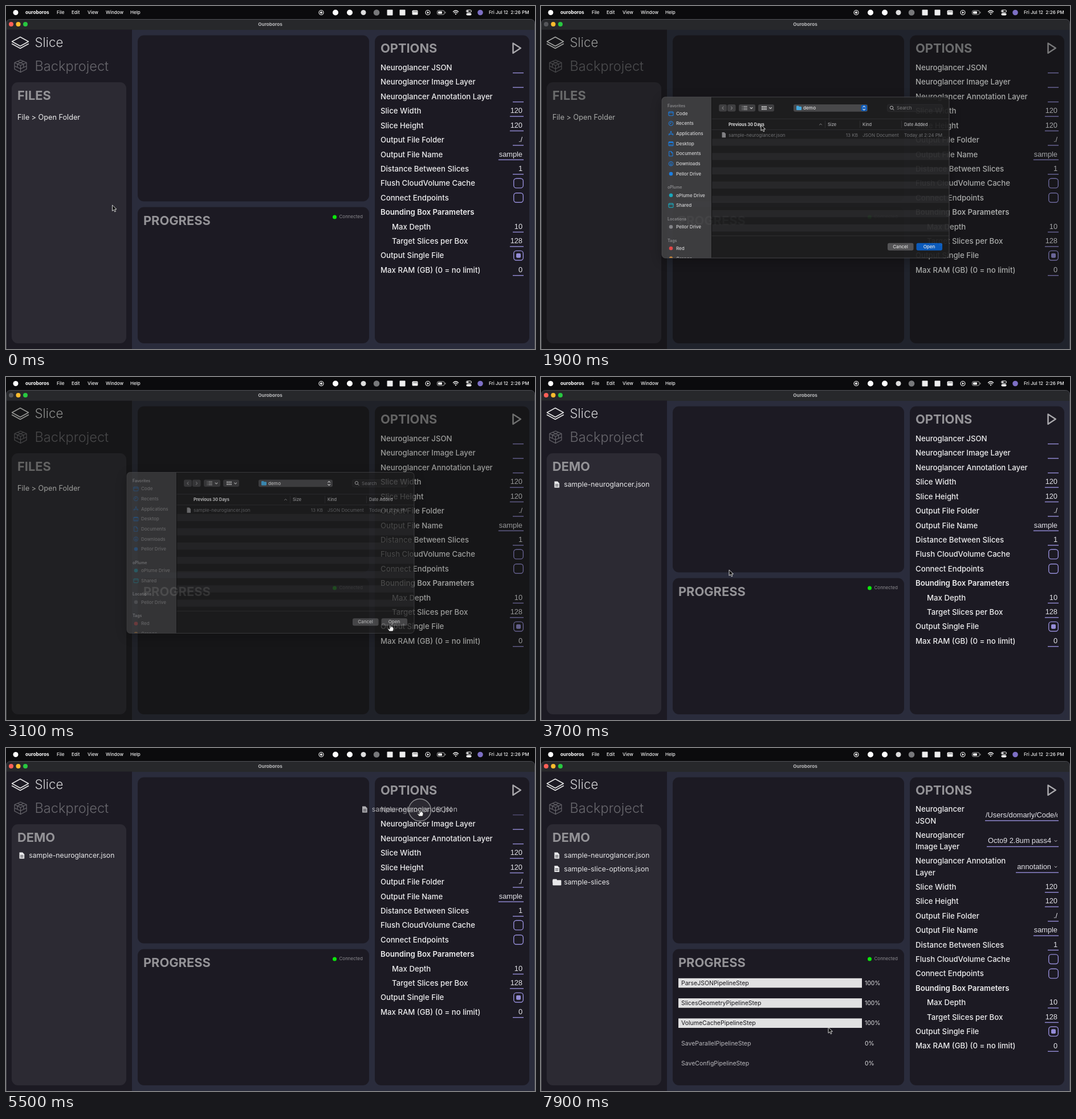
An HTML page for the animation above (8 s loop, 928 by 603 pixels).

```html
<!DOCTYPE html>
<html lang="en">
<head>
<meta charset="utf-8">
<title>Ouroboros</title>
<style>
html, body { margin: 0; width: 100%; height: 100%; overflow: hidden; background: #0b0b0d; }
svg { display: block; width: 100%; height: 100%; font-family: Inter, "Noto Sans", sans-serif; }
text { white-space: pre; }
</style>
</head>
<body>
<svg id="stage" viewBox="0 0 928 603"></svg>
<script>
const LOOP = 8000, STEP = 100;
const ACCENT = "#948cd6", PANEL = "#1c1a23", WHITE = "#eeeeef", HEADING = "#949397", BLUE = "#1a87f5";

// Markup helpers; text is placed by the middle of its capitals
const text = (x, y, size, str, fill = WHITE, extra = "") =>
  `<text x="${x}" y="${y + size * 0.36}" font-size="${size}" fill="${fill}" ${extra}>${str.replace(/>/g, "&gt;")}</text>`;
const rect = (x, y, w, h, fill, rx = 0, extra = "") =>
  `<rect x="${x}" y="${y}" width="${w}" height="${h}" rx="${rx}" fill="${fill}" ${extra}/>`;
const dot = (x, y, r, fill, extra = "") => `<circle cx="${x}" cy="${y}" r="${r}" fill="${fill}" ${extra}/>`;
const line = (d, stroke, width = 1, extra = "") =>
  `<path d="${d}" fill="none" stroke="${stroke}" stroke-width="${width}" stroke-linejoin="round" stroke-linecap="round" ${extra}/>`;
const group = (id, body, extra = "") => `<g id="${id}" ${extra}>${body}</g>`;
const weight = w => `font-weight="${w}"`;
const END = 'text-anchor="end"', MID = 'text-anchor="middle"';
const heading = (x, y, str) => text(x, y, 21.8, str, HEADING, weight(700));

function menuBar() {
  const menus = [[89, "File"], [115, "Edit"], [143, "View"], [175, "Window"], [218, "Help"]];
  const ring = x => dot(x, 11.5, 4, "none", 'stroke="#fff" stroke-width="1.1"');
  return rect(0, 0, 928, 23, "#0b0b0d") + dot(17, 11.5, 4.5, "#fff") +
    group("fileHighlight", rect(84, 3, 23, 17, "#45464b", 3)) +
    text(34, 11.2, 8.3, "ouroboros", "#fff", weight(700)) +
    menus.map(([x, s]) => text(x, 11.2, 8, s, "#f2f2f2", weight(500))).join("") +
    ring(553) + dot(553, 11.5, 2, "#fff") + dot(578, 11.5, 5, "#fff") + dot(603, 11.5, 5, "#fff") +
    dot(627, 11.5, 4.5, "#ddd") + dot(650, 11.5, 5.3, "#77787a") +
    rect(668.5, 6.5, 10, 10, "#eee", 1) + rect(690.5, 6.5, 10, 10, "#eee", 1) +
    rect(712.5, 7.5, 10, 8, "#f2f2f2", 1.5) + line("M715 10h1M717.5 10h1M720 10h1", "#222", 1) +
    ring(740) + `<path d="M738.8 9.3l3.5 2.2-3.5 2.2z" fill="#fff"/>` +
    rect(756.5, 8, 12.5, 7, "none", 2, 'stroke="#aaa"') + rect(758, 9.5, 7, 4, "#fff", 1) +
    line("M770.8 10.5v2", "#aaa") +
    line("M784.5 10q4.5-4 9 0M786.2 12q2.8-2.4 5.6 0", "#fff", 1.3) + dot(789, 14.2, 1.1, "#fff") +
    rect(807.5, 7, 9, 4, "none", 2, 'stroke="#fff"') + rect(807.5, 12.5, 9, 4, "#fff", 2) +
    dot(810, 9, 1.3, "#fff") + dot(832, 11.5, 4.8, "#7d6fc4") +
    text(847, 11.2, 8.1, "Fri Jul 12  2:26 PM", "#f2f2f2", weight(500));
}

function windowFrame() {
  return rect(0.5, 23.5, 927, 590, "#2a2c3c", 7, 'stroke="#505156"') +
    `<path d="M1 42V31q0-7 7-7h912q7 0 7 7v11z" fill="#27282b"/>` +
    dot(9, 32, 4, "#ff5f57", 'id="closeLight"') + dot(21.5, 32, 4, "#febc2e") + dot(34, 32, 4, "#28c840") +
    text(463.5, 31.6, 8.2, "Ouroboros", "#b8b8ba", MID + weight(700)) +
    rect(1, 41.5, 220, 562, PANEL) + rect(10, 134, 201, 459, "#2c2a33", 11) +
    rect(231, 51.5, 406, 292, PANEL, 11) + rect(231, 353.5, 406, 239.5, PANEL, 11) +
    rect(647, 51.5, 271, 541.5, PANEL, 11);
}

function modes() {
  return line("M25 54.5L39.5 62.5 25 70.5 10.5 62.5Z", "#e6e6e6", 1.5) +
    line("M10.5 66.5L25 74.5 39.5 66.5", "#e6e6e6", 1.5) +
    text(50.5, 64, 22.3, "Slice", "#d3d3d5", weight(300)) +
    line("M25.5 95L36 99.5V111L25.5 116.5 15 111V99.5ZM15 99.5L25.5 104.5 36 99.5M25.5 104.5V116.5M20 97.3L30.8 102V107M31 97.3L20 102V107M15 105.5L25.5 110.5 36 105.5", "#68676d", 1.2) +
    text(50.5, 105.5, 23.6, "Backproject", "#68676d", weight(300));
}

const docIcon = y => `<path d="M23.5 ${y - 5.5}h5.5l3.2 3.2v7.8h-8.7z" fill="#e8e8ea"/>` +
  line(`M25.5 ${y}h4.6M25.5 ${y + 2.6}h4.6`, "#2c2a33", 1);
const folderIcon = (x, y, w, h, fill) =>
  rect(x, y, w * 0.5, h * 0.6, fill, 1.2) + rect(x, y + h * 0.16, w, h * 0.84, fill, 1.2);
const fileRow = (y, name, icon = docIcon(y)) => icon + text(40.3, y, 12.2, name, "#e8e8ea");

function files() {
  return group("emptyFiles", heading(20, 157, "FILES") + text(20, 195.5, 12.7, "File > Open Folder")) +
    group("demoFiles", heading(20, 157, "DEMO") + fileRow(189, "sample-neuroglancer.json")) +
    group("optionsFile", fileRow(212.5, "sample-slice-options.json")) +
    group("slicesFolder", fileRow(236, "sample-slices", folderIcon(20.5, 230.5, 15, 11, "#e8e8ea")));
}

const steps = ["ParseJSON", "SlicesGeometry", "VolumeCache", "SaveParallel", "SaveConfig"];
function progress() {
  const rows = steps.map((name, i) => {
    const y = 413 + i * 35.3;
    return rect(241, y - 8.2, 322, 16.6, "#e1e1e2", 0, `id="bar${i}"`) +
      text(246, y, 10.5, name + "PipelineStep", "#ccc", `id="step${i}"`) +
      text(568, y, 10.3, "0%", "#e4e4e6", `id="pct${i}"`);
  }).join("");
  return heading(241, 377, "PROGRESS") + dot(576.5, 371, 3.5, "#0be70b") +
    text(584.5, 370.5, 8, "Connected", "#8b8a8f") + group("steps", rows);
}

const underline = (y, w) => rect(908 - w, y, w, 1.4, ACCENT);
const value = (x, y, str, extra = END) =>
  text(x, y, 12.8, str, "#e4e4ea", `font-family="Liberation Sans, Arial, sans-serif" ${extra}`);
const label = (x, y, str, w = 500) => text(x, y, 13.2, str, WHITE, weight(w));
function field(y, name, val, indent = 0) {
  let out = label(657 + indent, y, name, val === null ? 600 : 500);
  if (typeof val === "string") out += value(906, y - 0.8, val) + underline(y + 8.9, Math.max(19, val.length * 6.7 + 4));
  if (typeof val === "boolean") {
    out += rect(890.7, y - 8.3, 16.6, 16.6, "none", 4.5, `stroke="${ACCENT}" stroke-width="1.4"`);
    if (val) out += rect(895, y - 4, 8, 8, ACCENT, 2);
  }
  return out;
}
const commonFields = [
  ["Slice Width", "120"], ["Slice Height", "120"], ["Output File Folder", "./"], ["Output File Name", "sample"],
  ["Distance Between Slices", "1"], ["Flush CloudVolume Cache", false], ["Connect Endpoints", false],
  ["Bounding Box Parameters", null], ["Max Depth", "10", 20], ["Target Slices per Box", "128", 20],
  ["Output Single File", true], ["Max RAM (GB) (0 = no limit)", "0"]];

function options() {
  const pair = (y, a, b) => label(657, y, a) + label(657, y + 20.3, b);
  const select = (y, w, str) => value(895, y, str) + underline(y + 10.2, w) +
    line(`M901 ${y}l2 2 2-2`, "#c8c8cc", 1);
  return heading(657, 74.5, "OPTIONS") + line("M889.5 65.5L902.8 74 889.5 82.8Z", "#a9a8ac", 2.5) +
    group("blankLayers", group("jsonField", field(108, "Neuroglancer JSON", "")) +
      field(133.5, "Neuroglancer Image Layer", "") + field(159, "Neuroglancer Annotation Layer", "")) +
    group("loadedLayers", pair(107.5, "Neuroglancer", "JSON") + pair(153, "Neuroglancer", "Image Layer") +
      pair(198.5, "Neuroglancer Annotation", "Layer") +
      `<g clip-path="url(#pathClip)">${value(780, 117, "/Users/domarly/Code/demo", "")}</g>` + underline(127, 129) +
      select(162.5, 126, "Octo9 2.8um pass4") + select(208, 75, "annotation")) +
    group("common", commonFields.map(([n, v, ind], i) => field(184.5 + i * 25.42, n, v, ind)).join(""));
}

function fileMenu() {
  return rect(86, 23, 104, 52, "#2b2c30", 5, 'stroke="#505156" stroke-width=".6"') +
    rect(89, 27, 98, 16, "#0a60c8", 3, 'id="menuHover"') + text(96, 35, 8, "Open Folder", "#fff", weight(500)) +
    line("M94 47.5H182", "#505156", 0.8) + text(96, 60, 8, "Close Window", "#eee", weight(500));
}

function sheet() {
  const square = (x, y, c) => rect(x - 4, y - 3.3, 8, 7, "none", 1.3, `stroke="${c}" stroke-width="1.1"`);
  const icons = {
    folder: (x, y, c) => square(x, y, c) + line(`M${x - 4} ${y - 1.2}h8`, c, 1),
    clock: (x, y, c) => dot(x, y, 3.8, "none", `stroke="${c}"`) + line(`M${x} ${y - 2}v2h-1.6`, c),
    apps: (x, y, c) => line(`M${x - 3.5} ${y + 3}L${x + 0.5} ${y - 4}M${x - 0.5} ${y - 4}L${x + 3.5} ${y + 3}M${x - 4.2} ${y + 1}h8.4`, c),
    desk: (x, y, c) => square(x, y, c) + rect(x - 4, y - 3.3, 8, 2, c) + line(`M${x - 2.5} ${y + 2}h5`, c),
    doc: (x, y, c) => line(`M${x - 3} ${y - 4}h3.6l2.4 2.4v5.8h-6zM${x + 0.4} ${y - 4}v2.6h2.6`, c),
    down: (x, y, c) => dot(x, y, 3.8, "none", `stroke="${c}"`) + line(`M${x} ${y - 2}v4l-1.5-1.5M${x} ${y + 2}l1.5-1.5`, c),
    round: (x, y, c) => dot(x, y, 3.3, c)
  };
  const places = [[189, "Code", "folder"], [206.5, "Recents", "clock"], [224.3, "Applications", "apps"],
    [242, "Desktop", "desk"], [259.6, "Documents", "doc"], [277.3, "Downloads", "down"],
    [295, "Pellor Drive", "round"], [332.7, "oPlume Drive", "round", "#19b5c9"], [350.4, "Shared", "folder", "#19b5c9"],
    [388.2, "Pellor Drive", "round", "#8d8d90"], [426, "Red", "round", "#f14c4b"], [443.7, "Orange", "round", "#f3a13b"]];
  const sections = [[175, "Favorites"], [318.6, "oPlume"], [374.4, "Locations"], [412, "Tags"]];
  const columns = [[329, "Previous 30 Days"], [503, "Size"], [564, "Kind"], [637, "Date Added"]];
  const faint = "#77787a";
  let out = rect(212, 160, 504, 283, "#1e1e1f") + rect(212, 160, 87, 283, "#414143") + rect(299, 160, 1, 283, "#111");
  out += sections.map(([y, s]) => text(222, y, 7, s, "#939395", weight(600))).join("");
  out += group("places", places.map(([y, s, icon, c = BLUE]) =>
    icons[icon](228, y, c) + text(237, y, 8, s, "#e3e3e4", weight(500))).join(""));
  for (let i = 0; i < 7; i++) out += rect(300, 233.3 + i * 25.1, 416, 12.5, "#29292b");
  for (const [x, w] of [[312, 14], [327, 14.5], [347, 29], [381, 28]]) out += rect(x, 173, w, 12.5, "#434345", 3);
  out += line("M320 177l-2 2.3 2 2.3M333.5 177l2 2.3-2 2.3", "#8a8a8c", 1.1) +
    line("M353 176.5h.3M353 179.2h.3M353 182h.3M355.5 176.5h6M355.5 179.2h6M355.5 182h6M367 178.5l2 2 2-2M400.5 178.5l2 2 2-2", "#ccc", 1.1);
  for (let i = 0; i < 6; i++) out += rect(387 + i % 3 * 3.2, 176 + (i > 2 ? 3.8 : 0), 2.4, 2.7, "#ccc");
  out += rect(443, 173, 130, 12.7, "#4d4d4f", 3) + folderIcon(448, 175.5, 9, 7.5, "#49b6ee") +
    text(460, 179.3, 8.2, "demo", "#eee", weight(500)) + rect(561.5, 174, 10.5, 10.7, "#0a60c8", 2.5, 'id="popupTint"') +
    line("M564.7 177.8l2-2 2 2M564.7 181l2 2 2-2", "#eee", 1.1) +
    rect(607.5, 173, 96.5, 12.7, "#252526", 3, 'stroke="#343436" stroke-width=".6"') +
    dot(615, 178.7, 2.7, "none", 'stroke="#ccc"') + line("M617 180.8l2 2", "#ccc") +
    text(624, 179.3, 8, "Search", "#858587");
  out += line("M300 198.5H716M300 217.5H716M498.5 202V214M559.5 202V214M632.5 202V214M300 404H716", "#38383a", 0.8) +
    columns.map(([x, s], i) => text(x, 208, 7.4, s, i ? "#bdbdbf" : "#eee", weight(i ? 500 : 700))).join("") +
    line("M488.5 209l2-2 2 2", "#999");
  out += `<path d="M317.5 222h4l2.5 2.5v6.8h-6.5z" fill="#8a8a8c"/>` +
    text(329, 227, 8.1, "sample-neuroglancer.json", faint) + text(556, 227, 8.1, "13 KB", faint, END) +
    text(564, 227, 8.1, "JSON Document", faint) + text(637, 227, 8.1, "Today at 2:24 PM", faint);
  out += rect(608, 416.7, 45.5, 13, "#59595b", 3) + text(630.5, 423, 8, "Cancel", "#eee", MID + weight(500)) +
    rect(658.5, 416.7, 45.5, 13, "#0a60c8", 3, 'id="openTint"') + text(681, 423, 8, "Open", "#fff", MID + weight(500));
  return `<g clip-path="url(#sheetClip)">${out}</g>` +
    rect(212, 160, 504, 283, "none", 6, 'stroke="#565658" stroke-width=".8"');
}

function pointer() {
  const arrow = "M0 0V10.3L2.4 8 4.2 11.8 6 11 4.3 7.3H7.5Z";
  const hand = "M-1 1Q0-.6 1 1V4.3Q2-.2 4.9 4.5 6 4.3 6 6.5 6 9 4.6 11H-1.6Q-3 9-4.6 6.8-3.8 5.6-1 7.4Z";
  return group("ring", dot(0, 0, 19.5, "#88888a", 'fill-opacity=".14" stroke="#8b8b8e" stroke-width="1.4"')) +
    `<path id="arrow" d="${arrow}" fill="#111" stroke="#e6e6e6" stroke-width=".9" stroke-linejoin="round"/>` +
    `<path id="hand" d="${hand}" fill="#f4f4f4" stroke="#111" stroke-width=".8"/>`;
}

document.getElementById("stage").innerHTML =
  `<defs><clipPath id="pathClip"><rect x="779" y="105" width="127" height="24"/></clipPath>
  <clipPath id="sheetClip"><rect x="212" y="160" width="504" height="283" rx="6"/></clipPath></defs>` +
  windowFrame() + modes() + files() + progress() + options() +
  rect(1, 42, 926, 561, "#0c0f08", 0, 'id="dim"') +
  group("sheet", sheet(), 'style="filter:drop-shadow(0 5px 10px rgba(0,0,0,.3))"') + menuBar() + group("fileMenu", fileMenu()) +
  group("dragged", fileRow(189, "sample-neuroglancer.json"), 'opacity=".72"') + group("pointer", pointer());

const el = {};
document.querySelectorAll("[id]").forEach(node => el[node.id] = node);
const show = (id, on) => el[id].setAttribute("display", on ? "inline" : "none");
const move = (id, x, y) => el[id].setAttribute("transform", `translate(${x} ${y})`);

// Linear interpolation through [time, ...values]
function track(t, keys) {
  const next = keys.findIndex(k => k[0] > t);
  if (next < 0) return keys[keys.length - 1].slice(1);
  if (next === 0) return keys[0].slice(1);
  const a = keys[next - 1], b = keys[next], p = (t - a[0]) / (b[0] - a[0]);
  return a.slice(1).map((v, i) => v + (b[i + 1] - v) * p);
}

const cursorPath = [[0, 186.5, 350], [150, 175, 300], [400, 97, 12], [550, 97, 12], [750, 125, 36], [1000, 125, 36],
  [1400, 260, 130], [1900, 386, 209], [2500, 674, 428], [2700, 674, 428], [3000, 674, 436], [3100, 674, 436],
  [3500, 757, 352], [3600, 757, 352], [3700, 330, 339], [4100, 123, 196], [4800, 123, 196], [5000, 300, 165],
  [5400, 715, 110], [5500, 726, 109], [6200, 726, 109], [6500, 889, 70], [7200, 889, 70], [7600, 835, 209],
  [7700, 835, 209], [7800, 660, 365], [7900, 504, 491]];
const dimKeys = [[800, 0], [1000, 0.2], [1900, 0.3], [3100, 0.36], [3500, 0]];
const sheetKeys = [[800, 0, 8], [1000, 0.7, 1], [1900, 0.92, 0], [2200, 1, 0], [2700, 1, 0], [3100, 0.7, 7.5], [3400, 0, 12]];
const doneAt = [7000, 7300, 7600, LOOP, LOOP];

function render(t) {
  const within = (a, b) => t >= a && t < b;
  const [x, y] = track(t, cursorPath), [alpha, drop] = track(t, sheetKeys);
  const loaded = t >= 5800, hand = within(2700, 3400) || within(4100, 5900) || within(6500, 7400);

  move("pointer", x, y);
  show("hand", hand);
  show("arrow", !hand);
  show("ring", within(500, 600) || within(800, 900) || within(2700, 2900) || within(4600, 5800) || within(6600, 6800));

  show("fileMenu", within(500, 900));
  show("fileHighlight", within(500, 900));
  show("menuHover", t >= 700);
  el.closeLight.setAttribute("fill", within(1000, 3400) ? "#55565a" : "#ff5f57");
  el.dim.setAttribute("opacity", track(t, dimKeys)[0]);
  show("sheet", alpha > 0);
  el.sheet.setAttribute("opacity", alpha);
  move("sheet", 0, drop);
  el.places.setAttribute("opacity", t < 2800 ? 1 : 0.42);
  el.openTint.setAttribute("fill", t < 2800 ? "#0a60c8" : "#59595b");
  show("popupTint", t < 2800);

  show("emptyFiles", t < 3300);
  show("demoFiles", t >= 3300);
  show("optionsFile", t >= 7000);
  show("slicesFolder", t >= 7500);
  show("dragged", within(4700, 5800));
  move("dragged", x - 124.5, y - 190);

  show("blankLayers", !loaded);
  show("loadedLayers", loaded);
  move("common", 0, loaded ? 59.6 : 0);
  el.jsonField.setAttribute("opacity", within(5400, 5800) ? 0.45 : 1);

  show("steps", t >= 6800);
  steps.forEach((_, i) => {
    const done = t >= doneAt[i];
    show("bar" + i, done);
    el["step" + i].setAttribute("fill", done ? "#18171c" : "#b9b8bc");
    el["pct" + i].textContent = done ? "100%" : "0%";
  });
}

const start = performance.now();
function tick() {
  render(Math.floor((performance.now() - start) % LOOP / STEP) * STEP);
  requestAnimationFrame(tick);
}
tick();
</script>
</body>
</html>
```
